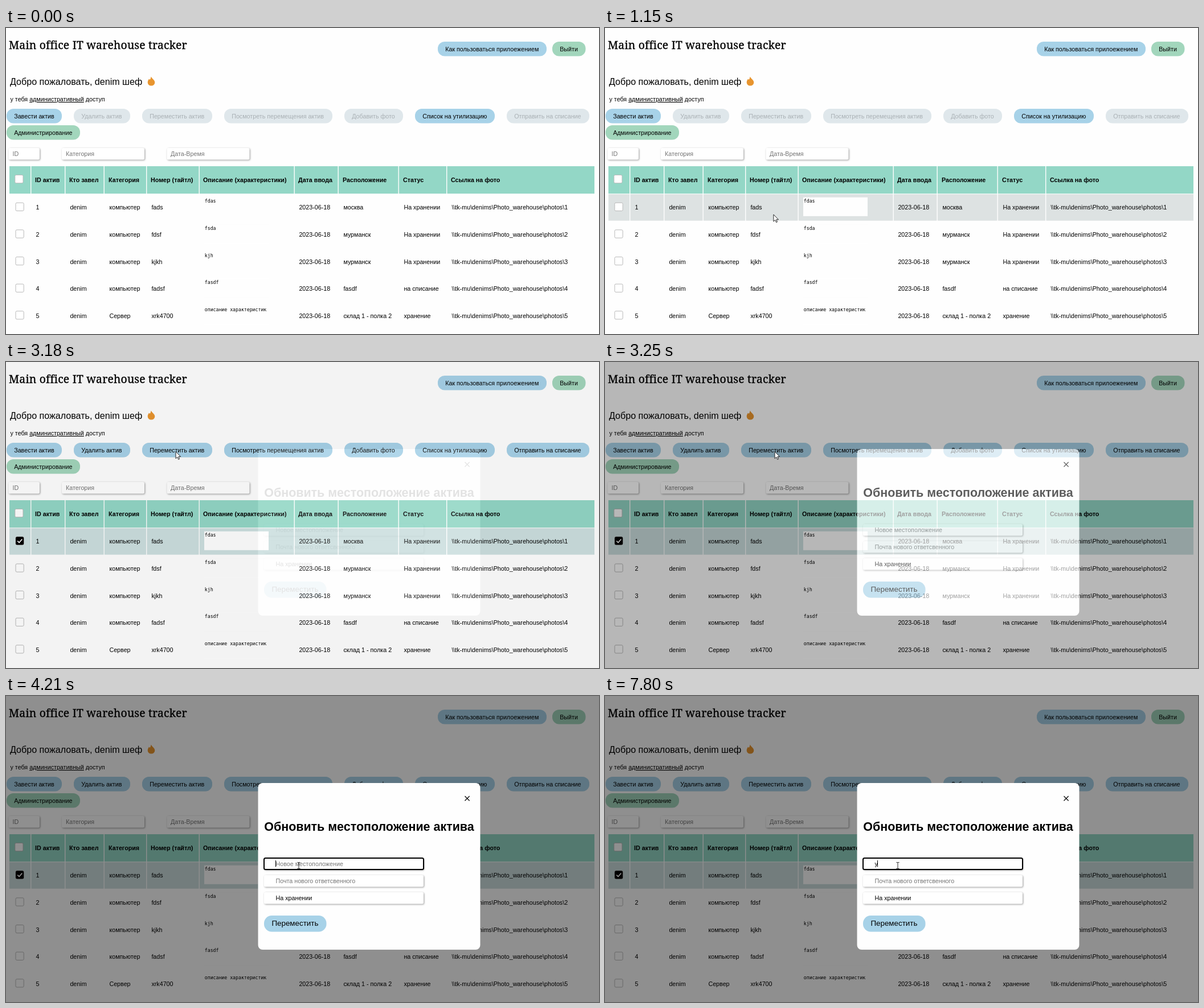
An HTML page that plays this animation: 1041x538 px, repeating every 8000 ms.

```html
<!DOCTYPE html>
<html lang="ru">
<head>
<meta charset="utf-8">
<title>Warehouse tracker</title>
<style>
  html, body { margin: 0; width: 100%; height: 100%; overflow: hidden; background: #fefefe; }
  svg { display: block; width: 1041px; height: 538px; }
  text { font: 10.72px "Liberation Sans", Arial, sans-serif; white-space: pre; }
  .title {
    font: 19.3px "Noto Serif", serif; font-variant-ligatures: none;
    letter-spacing: .23px; stroke: #000; stroke-width: .35px;
  }
  .welcome { font-size: 16.08px; }
  .bold { font-weight: bold; }
  .heading { font-size: 21.44px; font-weight: bold; }
  .big { font-size: 13.4px; }
  .mono { font: 8.2px "DejaVu Sans Mono", monospace; }
  .hint { fill: #757575; }
  .faded { fill: #a9b0b4; }
  .field { fill: #fff; filter: drop-shadow(1.1px 1.1px 1.5px #0006); }
</style>
</head>
<body>
<svg id="stage" viewBox="0 0 1041 538"></svg>
<script>
const BLUE = '#a7d2e8', GREEN = '#a2d6bc', GREY = '#dfe7eb';
const ROW_TOP = 292.3, ROW_STEP = 47.62, LOOP = 8000;

const text = (x, y, s, cls = '') => `<text x="${x}" y="${y}" class="${cls}">${s}</text>`;
const rect = (x, y, w, h, fill, rx = 0, more = '') =>
  `<rect x="${x}" y="${y}" width="${w}" height="${h}" fill="${fill}" rx="${rx}" ${more}/>`;
const button = (x, y, w, label, fill, cls) =>
  rect(x, y, w, 25.5, fill, 12) + text(x + 13.2, y + 16.5, label, cls);
const field = (x, y, w, label, pad, cls = 'hint') =>
  rect(x, y, w, 20.5, '#fff', 2.5, 'class="field"') + text(x + pad, y + 13.8, label, cls);
const checkbox = (x, y) => rect(x, y, 14.2, 14.2, '#fff', 2, 'stroke="#b9b9b9"');

// Toolbar: x, width, label, and whether it needs a selected row
const toolbar = [
  [1, 97, 'Завести актив'], [119, 99, 'Удалить актив', 1], [239, 123, 'Переместить актив', 1],
  [383, 190, 'Посмотреть перемещения актив', 1], [594, 103, 'Добавить фото', 1],
  [718, 140, 'Список на утилизацию'], [879, 145, 'Отправить на списание', 1],
];
const needsRow = toolbar.filter(b => b[3]);
const drawButtons = (list, fill, cls) => list.map(([x, w, s]) => button(x, 142, w, s, fill, cls)).join('');

const edges = [6, 43, 103, 171.5, 246, 338.5, 505.5, 582.5, 688.5, 773, 1033];
const headers = ['', 'ID актив', 'Кто завел', 'Категория', 'Номер (тайтл)', 'Описание (характеристики)',
  'Дата ввода', 'Расположение', 'Статус', 'Ссылка на фото'];
const headerX = [0, 51, 111, 180, 254, 346, 513, 591, 697, 781];
const rows = [
  ['компьютер', 'fads', 'fdas', 'москва', 'На хранении'],
  ['компьютер', 'fdsf', 'fsda', 'мурманск', 'На хранении'],
  ['компьютер', 'kjkh', 'kjh', 'мурманск', 'На хранении'],
  ['компьютер', 'fadsf', 'fasdf', 'fasdf', 'на списание'],
  ['Сервер', 'xrk4700', 'описание характеристик', 'склад 1 - полка 2', 'хранение'],
];
const photoDir = String.raw`\\tk-mu\denims\Photo_warehouse\photos` + '\\';

const cells = (y, h, fill) => edges.slice(1).map((end, i) => {
  const x = edges[i] + (i ? 1.4 : 0);
  return rect(x, y, end - x, h, fill);
}).join('');

function drawRow([kind, name, note, place, status], i) {
  const y = ROW_TOP + i * ROW_STEP, base = y + 27.1;
  const values = [i + 1, 'denim', kind, name, '', '2023-06-18', place, status, photoDir + (i + 1)];
  return rect(348, y + 5.5, 113, 33, '#fefefe') + checkbox(17, y + 15)
    + values.map((s, k) => text(headerX[k + 1] + 1.4, base, s)).join('')
    + text(348.8, y + 15, note, 'mono');
}

const page = `
  ${rect(0, 0, 1041, 538, '#fefefe')}
  ${text(5, 37.3, 'Main office IT warehouse tracker', 'title')}
  ${button(758, 24, 191, 'Как пользоваться прилоежением', BLUE)}
  ${button(959, 24, 58.5, 'Выйти', GREEN)}
  ${text(7, 99.5, 'Добро пожаловать, denim шеф', 'welcome')}
  <path fill="#e8952f" d="M254.6 85.5C257 90 261.3 91.500 261.3 95.800A6.3 5.800 0 0 1 248.7 95.800C248.7 93 250 91 251 89.500L252.3 91Q254.3 89 254.6 85.5Z"/>
  ${text(7.5, 129, 'у тебя <tspan text-decoration="underline">административный</tspan> доступ')}
  ${drawButtons(toolbar.filter(b => !b[3]), BLUE)}
  ${drawButtons(needsRow, GREY, 'faded')}
  <g id="enabled">${drawButtons(needsRow, BLUE)}</g>
  <g id="hoverButton">${drawButtons([toolbar[2]], '#97c6df')}</g>
  ${button(1, 171, 129, 'Администрирование', GREEN)}
  ${field(4.5, 211, 54.5, 'ID', 7)}
  ${field(98, 211, 145, 'Категория', 7)}
  ${field(282.5, 211, 145, 'Дата-Время', 6.5)}
  ${cells(243, 48.2, '#93d7c6')}
  ${checkbox(15.8, 258.5)}
  ${headers.map((s, i) => text(headerX[i], 270.6, s, 'bold')).join('')}
  <g id="hoverRow">${cells(0, 46.4, '#dde2e2')}</g>
  <g id="pickedRow">${cells(ROW_TOP, 46.4, '#ccdfdf')}</g>
  ${rows.map(drawRow).join('')}
  <g id="tick">${rect(17, 307.3, 14.2, 14.2, '#000', 2.5)}
    <path d="M20.3 314.7l2.8 2.8 5.2-6" fill="none" stroke="#fff" stroke-width="1.7"/></g>`;

const dialog = `
  ${rect(0, 0, 1041, 538, '#000', 0, 'opacity=".44"')}
  ${rect(442.5, 153, 390, 293, '#fefefe', 8)}
  <path d="M805.5 176l8.2 8.2m0-8.2l-8.2 8.2" stroke="#111" stroke-width="1.3"/>
  ${text(453.3, 237, 'Обновить местоположение актива', 'heading')}
  ${field(453, 285, 280, '', 20.5)}
  ${rect(453, 285, 280, 20, '#fff', 2.5, 'id="focus" stroke="#000" stroke-width="2"')}
  <text id="entry" x="473.5" y="298.8"></text>
  ${rect(0, 289, 1, 11.5, '#000', 0, 'id="caret"')}
  ${field(453, 315, 280, 'Почта нового ответсвенного', 20.5)}
  ${field(453, 345, 280, 'На хранении', 20.5, '')}
  ${rect(453, 386, 109.5, 28.5, BLUE, 13.5)}
  ${text(466.4, 404.4, 'Переместить', 'big')}`;

const pointer = `
  <path id="arrow" d="M0 0V12.2L2.8 9.6 4.7 13.8 6.6 13 4.8 8.9H8.6Z" fill="#fff" stroke="#111" stroke-width=".9"/>
  <path id="beam" d="M-2.5-5.5H-.8L0-4.9 .8-5.5H2.5M0-5V5M-2.5 5.5H-.8L0 4.9 .8 5.5H2.5" fill="none" stroke="#111" stroke-width=".9"/>`;

document.getElementById('stage').innerHTML =
  `${page}<g id="dialog">${dialog}</g><g id="pointer">${pointer}</g>`;

const el = id => document.getElementById(id);
const fade = (id, value) => el(id).setAttribute('opacity', +value);
const ramp = (t, from, to) => Math.min(1, Math.max(0, (t - from) / (to - from)));

// Pointer path: time, x, y
const path = [
  [0, 935, 520], [70, 900, 465], [140, 864, 406], [400, 600, 290], [550, 480, 259], [700, 402, 275],
  [870, 327, 316], [1150, 296, 328], [1440, 264, 314], [1590, 264, 318], [2250, 264, 318],
  [2320, 265, 311], [2700, 285, 200], [3050, 298, 157.5], [3500, 298, 157.5], [3840, 514, 298], [LOOP, 514, 298],
];
function pointerAt(t) {
  const i = Math.max(1, path.findIndex(p => p[0] >= t));
  const [t0, x0, y0] = path[i - 1], [t1, x1, y1] = path[i];
  const p = ramp(t, t0, t1);
  return [x0 + (x1 - x0) * p, y0 + (y1 - y0) * p];
}

// Input states: time, typed text, caret shown
const typing = [
  [0, '', 0], [4120, '', 1], [4640, '', 0], [5000, 'e', 1], [5280, 'ec', 1], [5500, 'ecr', 1],
  [6000, 'ecr', 0], [6510, 'ecr', 1], [6650, 'ec', 1], [6860, 'e', 1], [7020, '', 1],
  [7580, '', 0], [7800, 'у', 1],
];
// Dialog opacity as captured: time, value
const opening = [[0, 0], [3130, .1], [3190, .38], [3250, .63], [3350, .93], [3410, 1]];
const stateAt = (list, t) => list.findLast(s => s[0] <= t);

function draw(t) {
  const [x, y] = pointerAt(t);
  const isBeam = (t >= 1590 && t < 2390) || t >= 3840;
  el('pointer').setAttribute('transform', `translate(${x} ${y})`);
  fade('pointer', t >= 70);
  fade('arrow', !isBeam);
  fade('beam', isBeam);

  // Row highlight trails the pointer slightly
  const row = Math.floor((pointerAt(Math.max(0, t - 70))[1] - ROW_TOP) / ROW_STEP);
  fade('hoverRow', t >= 70 && t < 3130 && row >= 0 && row < rows.length);
  el('hoverRow').setAttribute('transform', `translate(0 ${ROW_TOP + row * ROW_STEP})`);

  const picked = ramp(t, 1690, 1880);
  fade('pickedRow', picked);
  fade('enabled', picked);
  fade('tick', t >= 1740);
  fade('hoverButton', t < 3130 ? ramp(t, 2900, 3050) : 0);

  fade('dialog', stateAt(opening, t)[1]);
  const [, typed, caret] = stateAt(typing, t);
  const entry = el('entry');
  entry.textContent = typed || 'Новое местоположение';
  entry.setAttribute('class', typed ? '' : 'hint');
  fade('focus', t >= 4120);
  fade('caret', caret);
  el('caret').setAttribute('x', 473 + (typed ? Math.round(entry.getComputedTextLength()) : 0));
}

function tick(now) {
  draw(now % LOOP);
  requestAnimationFrame(tick);
}
draw(0);
requestAnimationFrame(tick);
</script>
</body>
</html>
```
